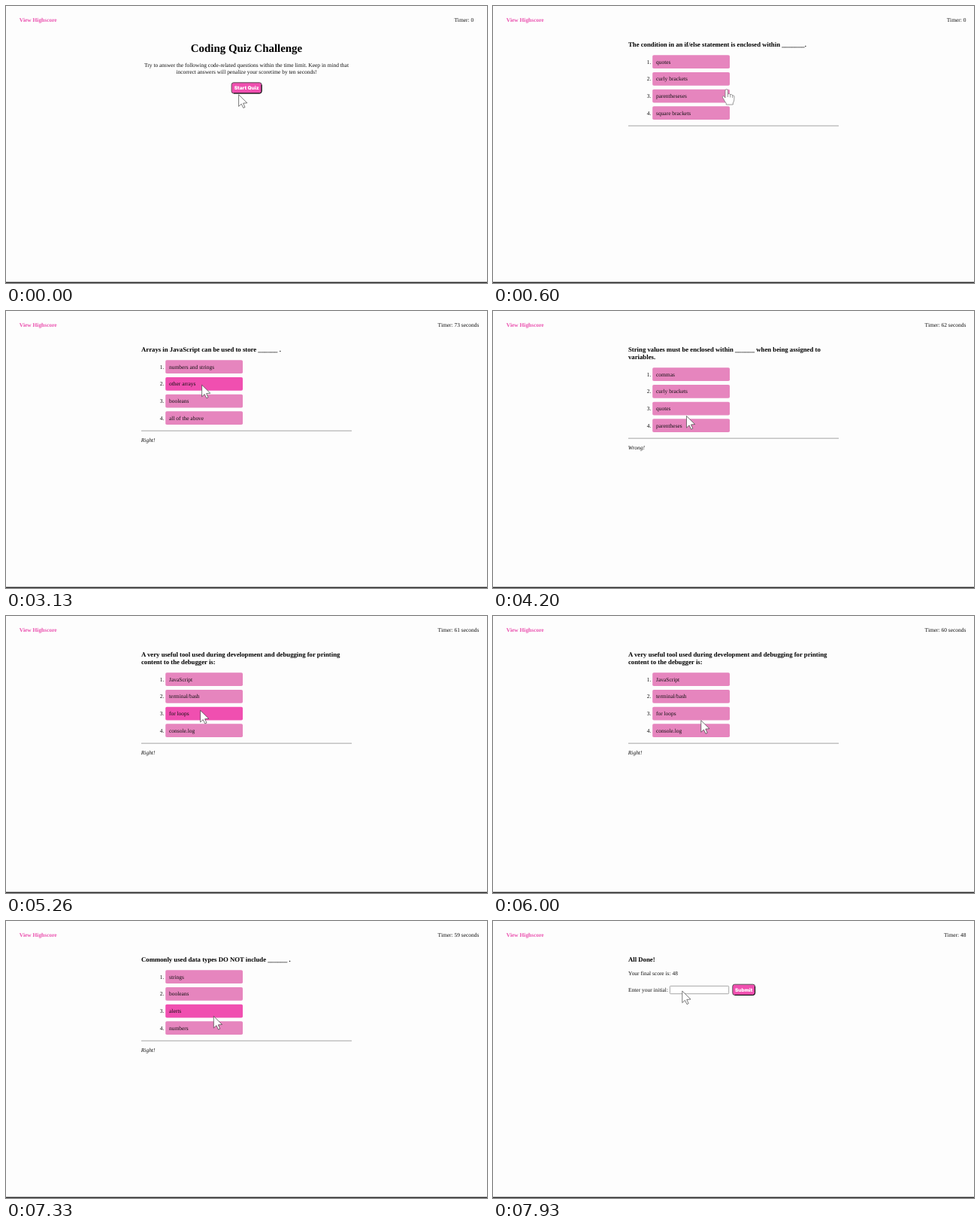
An HTML page for the animation above (8000 ms loop, 640 by 368 pixels).

```html
<!DOCTYPE html>
<html lang="en">
<head>
<meta charset="utf-8">
<title>Coding Quiz</title>
<style>
  html, body { margin: 0; width: 100%; height: 100%; overflow: hidden; background: #fdfdfd; }
  svg { display: block; width: 640px; height: 368px; }
  text { font: 7.467px "Liberation Serif", serif; fill: #111; text-rendering: geometricPrecision; white-space: pre; }
  .link { font-weight: bold; fill: #ea4fae; }
  .title { font-size: 14.93px; font-weight: bold; fill: #000; }
  .ask { font-size: 8.736px; font-weight: bold; fill: #000; }
  .note { font-style: italic; }
  .mid { text-anchor: middle; }
  .end { text-anchor: end; }
  .label { font: 900 6.5px Inter, sans-serif; fill: #fff; text-anchor: middle; }
  .option { fill: #e685be; }
  .option.hover { fill: #f04fb0; }
  .face { fill: #f04fb0; stroke: #4c4c4c; stroke-width: .93; }
  .edge { fill: none; stroke: #000; stroke-width: .95; }
  .field { fill: #fff; stroke: #858585; stroke-width: .7; }
  .pointer path { fill: #fff; stroke: #333; stroke-width: .65; stroke-linejoin: round; }
</style>
</head>
<body>
<svg viewBox="0 0 640 368">
  <rect width="640" height="368" fill="#fdfdfd"/>
  <text class="link" x="17.8" y="20.7">View Highscore</text>
  <text id="timer" class="end"></text>
  <g id="page"></g>
  <rect y="366.6" width="640" height="1.4" fill="#2a2a2a"/>
  <g id="pointer" class="pointer">
    <path id="arrow" d="M0 0V15.6L3.6 12.3L6.2 17.6L8.4 16.6L6 11.4L11.2 11Z"/>
    <path id="hand" d="M-2 1.5Q-2 -.3 -.3 -.3Q1.5 -.3 1.5 1.5V6.2Q2 5.3 3.4 5.6Q4.6 5.8 4.7 7Q5.2 6.2 6.5 6.6Q7.6 7 7.7 8Q8.6 7.5 9.5 8.2Q10.2 8.8 10 10L9.8 14Q9.5 16 8.3 18V20H-.7V18.3Q-2.5 16 -4 13Q-6 10.5 -5.6 9.3Q-4.5 8 -3 9.5L-2 11ZM1.5 6V10M4.7 7V10.5M7.7 8V11" style="stroke:#666"/>
  </g>
</svg>
<script>
const LOOP = 8000;
const FPS = 15;
const OPTION = { x: 212.2, y: 65.3, w: 102.8, h: 17.8, pitch: 22.67 };
const LINE = 10;

// Every time below is counted in steps of 1/15 s.
const scenes = [
  { at: 0, draw: drawStart },
  { at: 9, ask: ['The condition in an if/else statement is enclosed within _______.'],
    options: ['quotes', 'curly brackets', 'parentheseses', 'square brackets'] },
  { at: 30, ask: ['Arrays in JavaScript can be used to store ______ .'],
    options: ['numbers and strings', 'other arrays', 'booleans', 'all of the above'], note: 'Right!' },
  { at: 50, ask: ['String values must be enclosed within ______ when being assigned to', 'variables.'],
    options: ['commas', 'curly brackets', 'quotes', 'parentheses'], note: 'Wrong!' },
  { at: 77, ask: ['A very useful tool used during development and debugging for printing', 'content to the debugger is:'],
    options: ['JavaScript', 'terminal/bash', 'for loops', 'console.log'], note: 'Right!' },
  { at: 101, ask: ['Commonly used data types DO NOT include ______ .'],
    options: ['strings', 'booleans', 'alerts', 'numbers'], note: 'Right!' },
  { at: 119, draw: drawDone }
];

// Pointer stops: step, x, y
const stops = [
  [0, 309.6, 117.8], [8, 311, 111], [20, 311, 111], [32, 297.3, 117.6],
  [34, 297.3, 117.6], [37, 291, 114], [38, 291, 114], [47, 260.6, 98.2],
  [53, 260.6, 98.2], [66, 257, 146], [76, 258.6, 125.4], [81, 258.6, 125.4],
  [99, 295, 152], [105, 295, 152], [116, 251.8, 93]
];

const $ = id => document.getElementById(id);
const page = $('page');

const text = (s, x, y, cls = '') => `<text class="${cls}" x="${x}" y="${y}">${s}</text>`;

const rect = (cls, x, y, w, h, r) =>
  `<rect class="${cls}" x="${x}" y="${y}" width="${w}" height="${h}" rx="${r}"/>`;

function button(s, x, y, w, h) {
  const r = 2.8;
  const edge = `M${x + w} ${y + r}V${y + h - r}Q${x + w} ${y + h} ${x + w - r} ${y + h}H${x + r}`;
  return rect('face', x, y, w, h, r) + `<path class="edge" d="${edge}"/>` +
    text(s, x + w / 2, y + h / 2 + 2.4, 'label');
}

function drawStart() {
  return text('Coding Quiz Challenge', 320, 60.6, 'title mid') +
    text('Try to answer the following code-related questions within the time limit. Keep in mind that', 320, 80.9, 'mid') +
    text('incorrect answers will penalize your scoretime by ten seconds!', 320, 89.5, 'mid') +
    button('Start Quiz', 300.1, 101.8, 40, 14.2);
}

function drawDone() {
  return text('All Done!', 180, 54.3, 'ask') +
    text('Your final score is: 48', 180, 72.2) +
    text('Enter your initial:', 180, 94) +
    rect('field', 235.4, 86.4, 78.3, 10.3, .9) +
    button('Submit', 318.8, 84.2, 29.8, 14.2);
}

const optionTop = (scene, i) => OPTION.y + OPTION.pitch * i + LINE * (scene.ask.length - 1);

function drawQuestion(scene) {
  const ask = scene.ask.map((s, i) => text(s, 180, 54.3 + LINE * i, 'ask'));
  const options = scene.options.map((s, i) => {
    const y = optionTop(scene, i);
    return rect('option', OPTION.x, y, OPTION.w, OPTION.h, 1.8) +
      text(`${i + 1}.`, 210.4, y + 11.4, 'end') + text(s, 217, y + 11.4);
  });
  const rule = optionTop(scene, 4) + 2.7;
  return ask.join('') + options.join('') +
    `<rect x="180" y="${rule}" width="280" height=".9" fill="#999"/>` +
    text(scene.note || '', 179.8, rule + 15.5, 'note');
}

function pointerAt(step) {
  const n = stops.findIndex(s => s[0] > step);
  if (n < 0) return stops[stops.length - 1].slice(1);
  const [t0, x0, y0] = stops[n - 1], [t1, x1, y1] = stops[n];
  const k = (step - t0) / (t1 - t0), e = k * k * (3 - 2 * k);
  return [x0 + (x1 - x0) * e, y0 + (y1 - y0) * e];
}

function timerText(step) {
  if (step < 24) return 'Timer: 0';
  if (step >= 119) return 'Timer: 48';
  const penalty = step >= 50 ? 10 : 0;
  return `Timer: ${74 - Math.floor((step - 24) / FPS) - penalty} seconds`;
}

let shown = null;

function render(step) {
  const scene = scenes.filter(s => s.at <= step).pop();
  if (scene !== shown) {
    page.innerHTML = scene.draw ? scene.draw() : drawQuestion(scene);
    shown = scene;
  }

  const [x, y] = pointerAt(step);
  const isHand = step < 21 && y < 116.5;
  $('pointer').setAttribute('transform', `translate(${x} ${y})`);
  $('hand').style.display = isHand ? '' : 'none';
  $('arrow').style.display = isHand ? 'none' : '';

  page.querySelectorAll('.option').forEach((el, i) => {
    const dy = y - optionTop(scene, i);
    const inside = x > OPTION.x && x < OPTION.x + OPTION.w && dy >= 0 && dy < OPTION.h;
    el.classList.toggle('hover', inside && !isHand);
  });

  const timer = $('timer');
  timer.setAttribute('x', step < 9 ? 622.2 : 629.4);
  timer.setAttribute('y', step < 9 ? 20.8 : 21.2);
  timer.textContent = timerText(step);
}

const start = performance.now();

function tick() {
  const t = (performance.now() - start) % LOOP;
  render(Math.min(119, Math.floor((t + 7) * FPS / 1000)));
  requestAnimationFrame(tick);
}
tick();
</script>
</body>
</html>
```
